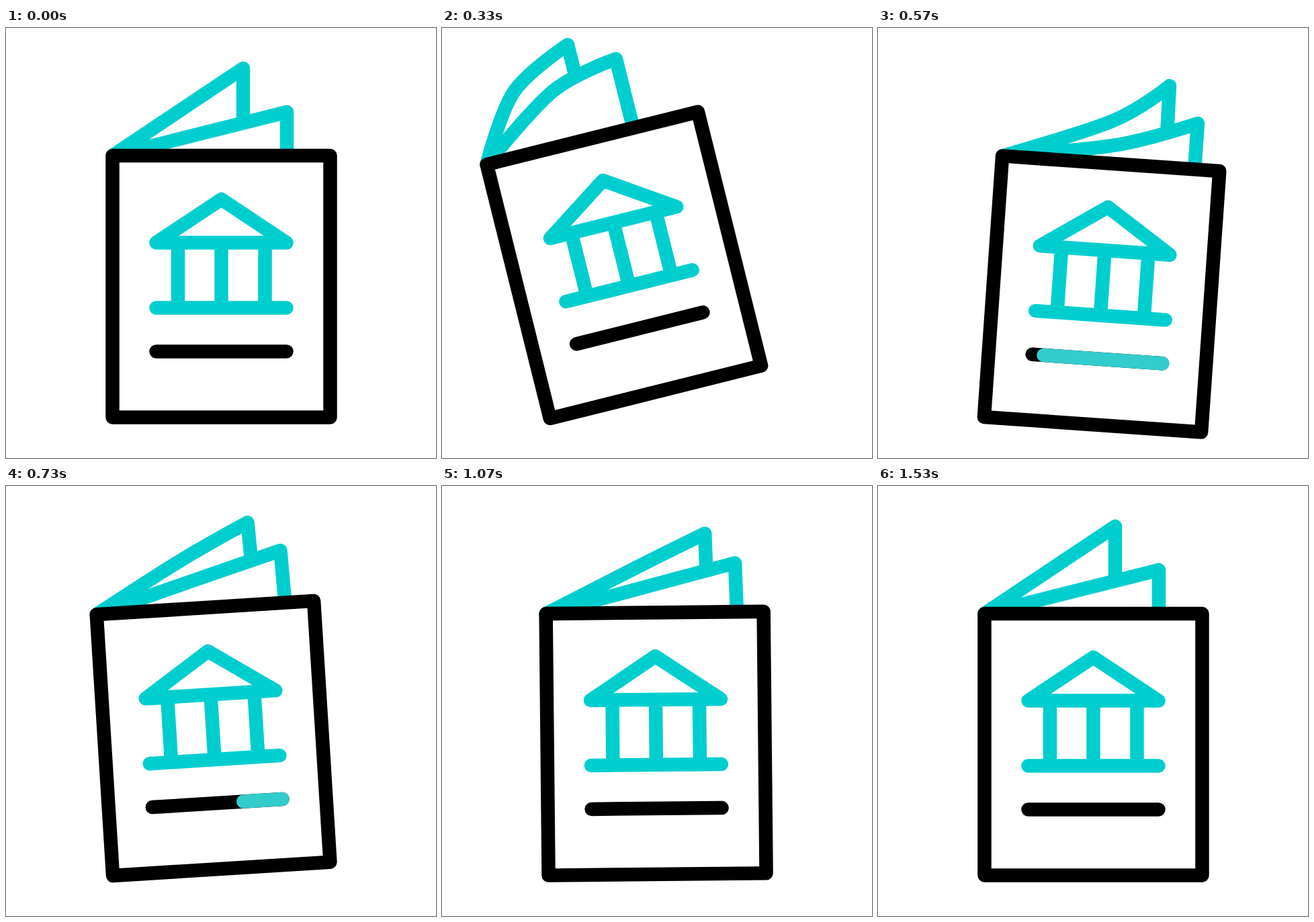
Write an HTML page that moves like this. It is 640 px wide and 640 px high and loops after 2100 ms.

```html
<!DOCTYPE html>
<html lang="en">
<head>
<meta charset="utf-8">
<title>Bank booklet</title>
<style>
  html, body { margin: 0; width: 100%; height: 100%; overflow: hidden; background: #fff; }
  svg { display: block; width: 100%; height: 100%; }
  path { fill: none; stroke-width: 20.5; stroke-linecap: round; stroke-linejoin: round; }
  .page, .cover { fill: #fff; }
  .cyan { stroke: #00cece; }
  .black { stroke: #000; }
  .glint { stroke: #3cc; }
</style>
</head>
<body>
<svg viewBox="0 0 640 640">
  <g id="book">
    <path id="back" class="page cyan"/>
    <path id="front" class="page cyan"/>
    <path class="cover black" d="M158.5 190H482.5V579.5H158.5Z"/>
    <path class="cyan" d="M320.5 255L417.5 319.5H223.5ZM256 319.5V416.5M320.5 319.5V416.5M385.5 319.5V416.5M223.5 416.5H417.5"/>
    <path class="black" d="M223.5 481.5H417.5"/>
    <path id="glint" class="glint"/>
  </g>
</svg>
<script>
const LOOP = 2100;
const HINGE = [158.5, 190];
const LINE = { x: 223.5, y: 481.5, length: 194 };

// Poses at 30 ticks per second.
// Pages: middle x, y, tip x, y, sideways offset of the lower edge.
const poses = [
  { tick: 0,  angle: 0,   back: [271.3, 114.6, 353, 60, 0],       front: [306.4, 153, 418, 125, 0] },
  { tick: 10, angle: -14, back: [223.9, 94.9, 318.5, 46.3, 0],    front: [280.4, 108, 383.2, 84.1, 0] },
  { tick: 17, angle: 4,   back: [319.3, 126.2, 399.5, 68.6, 2],   front: [327.8, 161.7, 445.3, 121.4, 0] },
  { tick: 26, angle: -9,  back: [262.7, 113.5, 385.6, 66.6, 6],   front: [306, 134.5, 432.1, 105.4, 3.5] },
  { tick: 36, angle: 4,   back: [321, 122.5, 402, 76.6, 2],       front: [330, 155, 445.2, 124, 1.5] },
];
poses.push({ ...poses[0], tick: 46 });

const $ = id => document.getElementById(id);
const book = $('book'), back = $('back'), front = $('front'), glint = $('glint');

const mix = (a, b, u) => a + (b - a) * u;
const mixAll = (a, b, u) => a.map((v, i) => mix(v, b[i], u));

function ease(tick, from, to) {
  const u = Math.min(1, Math.max(0, (tick - from) / (to - from)));
  return u * u * (3 - 2 * u);
}

function pagePath([mx, my, tx, ty, lean]) {
  const [x, y] = HINGE;
  const hx = (tx - x) * 0.17, hy = (ty - y) * 0.17;
  return `M${x} ${y}C${x} ${y} ${mx - hx} ${my - hy} ${mx} ${my}` +
    `C${mx + hx} ${my + hy} ${tx} ${ty} ${tx} ${ty}L${tx + lean} ${y}`;
}

function drawGlint(tick) {
  const start = ease(tick, 15, 26), end = ease(tick, 10, 17);
  const at = u => LINE.x + LINE.length * u;
  glint.setAttribute('d', end > start ? `M${at(start)} ${LINE.y}H${at(end)}` : '');
}

// Ticks fall at 0, 30 and 70 ms of every tenth of a second.
function tickAt(ms) {
  const rest = ms % 100;
  return 3 * Math.floor(ms / 100) + (rest >= 30) + (rest >= 70);
}

function draw() {
  const tick = tickAt(performance.now() % LOOP);
  const i = Math.max(1, poses.findIndex(p => p.tick >= tick));
  const last = poses.length - 1;
  const k = tick >= poses[last].tick ? last : i;
  const a = poses[k - 1], b = poses[k];
  const u = ease(tick, a.tick, b.tick);

  book.setAttribute('transform', `rotate(${mix(a.angle, b.angle, u)} 166 571)`);
  back.setAttribute('d', pagePath(mixAll(a.back, b.back, u)));
  front.setAttribute('d', pagePath(mixAll(a.front, b.front, u)));
  drawGlint(tick);
  requestAnimationFrame(draw);
}
draw();
</script>
</body>
</html>
```
